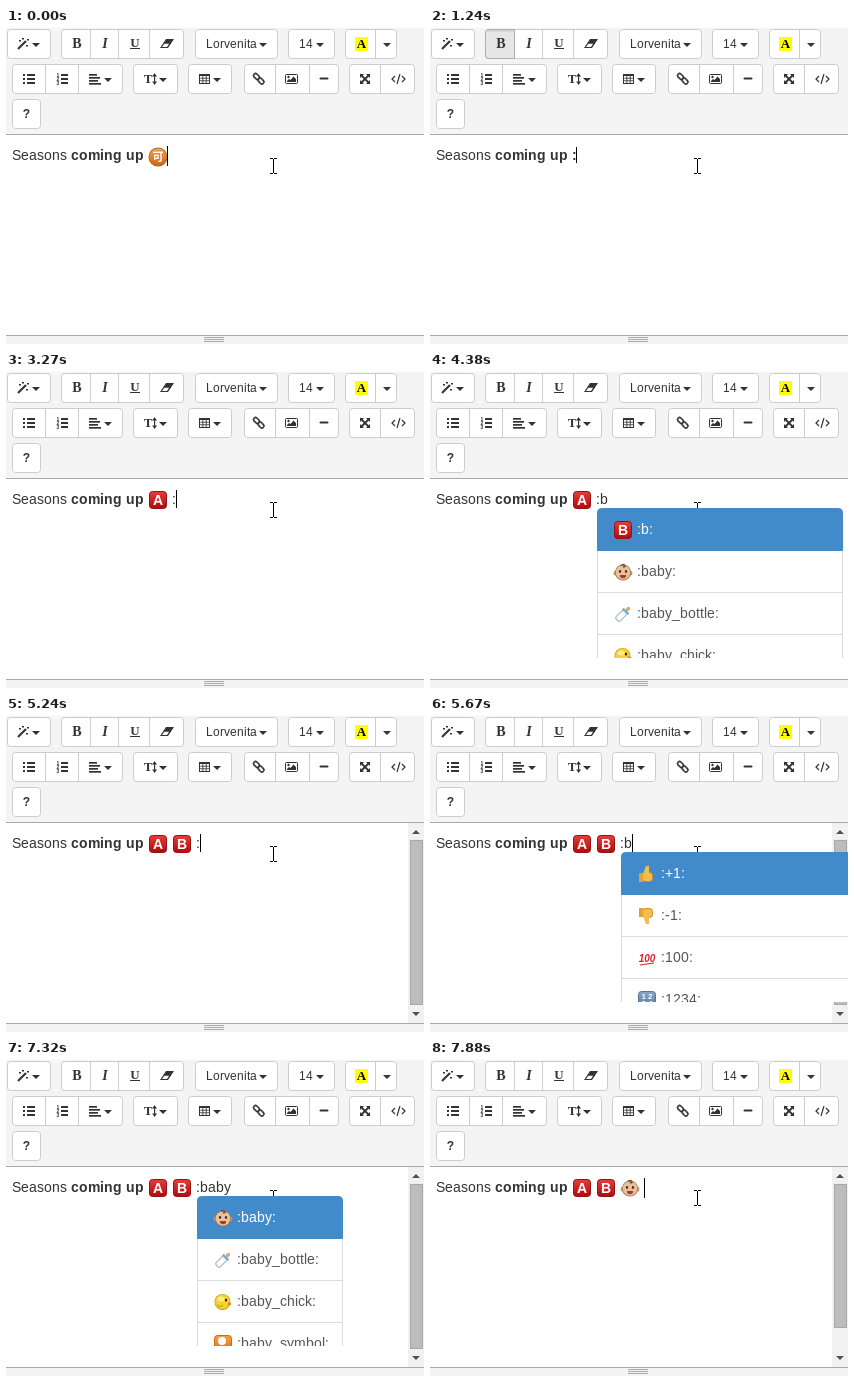
An HTML page with a canvas that plays this animation: 418x316 px, repeating every 8000 ms.

```html
<!DOCTYPE html>
<html lang="en">
<head>
<meta charset="utf-8">
<title>Emoji autocomplete in a text editor</title>
<style>
html, body { margin: 0; width: 100%; height: 100%; overflow: hidden; background: #fff; }
canvas { display: block; width: 418px; height: 316px; }
</style>
</head>
<body>
<canvas id="stage" width="418" height="316"></canvas>
<script>
const ctx = document.getElementById('stage').getContext('2d');
const SANS = '"Liberation Sans", Arial, sans-serif';
const SERIF = '"Liberation Serif", "Times New Roman", serif';
const INK = '#333';
const LOOP = 8000;

// Each step changes only the listed parts of the editor state.
const STEPS = [
  [0, { line: '{accept}', bold: false, caret: true, menu: null, thumbEnd: 0 }],
  [140, { line: '', bold: true }],
  [710, { caret: false }],
  [1240, { line: ':', caret: true }],
  [1520, { menu: '' }],
  [1670, { line: ':a' }],
  [1800, { menu: 'a' }],
  [2330, { caret: false }],
  [2580, { line: '{a}', menu: null, caret: true }],
  [2730, { line: '{a} ' }],
  [2860, { bold: false }],
  [3270, { line: '{a} :' }],
  [3520, { menu: '' }],
  [3670, { line: '{a} :b' }],
  [3800, { menu: 'b' }],
  [4380, { caret: false }],
  [4530, { line: '{a} {b}', menu: null, caret: true, thumbEnd: 289 }],
  [4930, { line: '{a} {b} ' }],
  [5240, { line: '{a} {b} :' }],
  [5520, { menu: '' }],
  [5670, { line: '{a} {b} :b' }],
  [5820, { menu: 'b' }],
  [5940, { line: '{a} {b} :ba' }],
  [6090, { menu: 'ba' }],
  [6480, { line: '{a} {b} :bab' }],
  [6620, { line: '{a} {b} :baby', menu: 'baby' }],
  [7320, { caret: false }],
  [7600, { line: '{a} {b} {baby}', menu: null, caret: true, thumbEnd: 268 }],
  [7880, { line: '{a} {b} {baby} ' }]
];

const MENUS = {
  '': { width: 290, names: ['+1', '-1', '100', '1234'] },
  a: { width: 221, names: ['a', 'ab', 'abc', 'abcd'] },
  b: { width: 246, names: ['b', 'baby', 'baby_bottle', 'baby_chick'] },
  ba: { width: 205, names: ['baby', 'baby_bottle', 'baby_chick', 'baby_symbol'] },
  baby: { width: 146, names: ['baby', 'baby_bottle', 'baby_chick', 'baby_symbol'] }
};

function rect(x, y, w, h, color) {
  ctx.fillStyle = color;
  ctx.fillRect(x, y, w, h);
}

function shape(color, points) {
  ctx.fillStyle = color;
  ctx.beginPath();
  points.forEach(([x, y]) => ctx.lineTo(x, y));
  ctx.fill();
}

function stroke(color, width, points) {
  ctx.strokeStyle = color;
  ctx.lineWidth = width;
  ctx.beginPath();
  points.forEach(([x, y]) => ctx.lineTo(x, y));
  ctx.stroke();
}

function oval(x, y, rx, ry, color) {
  ctx.fillStyle = color;
  ctx.beginPath();
  ctx.ellipse(x, y, rx, ry, 0, 0, Math.PI * 2);
  ctx.fill();
}

function box(x, y, w, h, radius, fill, border) {
  ctx.beginPath();
  ctx.roundRect(x + 0.5, y + 0.5, w - 1, h - 1, radius);
  ctx.fillStyle = fill;
  ctx.fill();
  if (border) {
    ctx.strokeStyle = border;
    ctx.lineWidth = 1;
    ctx.stroke();
  }
}

function fade(top, bottom) {
  const g = ctx.createLinearGradient(0, -9, 0, 9);
  g.addColorStop(0, top);
  g.addColorStop(1, bottom);
  return g;
}

// Text set on whole-pixel advances, as a hinted screen font would be.
function type(text, x, y, font, color) {
  ctx.font = font;
  ctx.fillStyle = color;
  ctx.textAlign = 'left';
  for (const ch of text) {
    ctx.fillText(ch, x, y);
    x += ch === ':' ? 4 : Math.round(ctx.measureText(ch).width);
  }
  return x;
}

function label(text, x, y, font, color) {
  ctx.font = font;
  ctx.fillStyle = color;
  ctx.textAlign = 'center';
  ctx.fillText(text, x, y);
}

// ---- emoji, drawn around their centre ----

function tile(top, bottom, edge, ...rows) {
  const size = rows.length > 1 ? 8 : [0, 14, 11, 9][rows[0].length];
  box(-9, -9, 18, 18, 3, fade(top, bottom), edge);
  rows.forEach((row, i) => {
    const y = rows.length > 1 ? -1 + i * 7 : size * 0.35;
    label(row, 0, y, `bold ${size}px ${SANS}`, '#fff');
  });
}
const redTile = text => tile('#e5413b', '#b3060b', '#9b1014', text);
const blueTile = (...rows) => tile('#8aa9c9', '#52749c', '#54749a', ...rows);

function thumb(dir) {
  ctx.scale(1, dir);
  box(-5, -2, 11, 10, 3, '#f5bd4c', '#c98a28');
  shape('#f5bd4c', [[-4, 0], [-1, -8], [2, -8], [2, 0]]);
  rect(-8, -1, 4, 9, '#e0a33a');
}

function babyFace() {
  oval(-7.5, 1, 2, 2.5, '#c99468');
  oval(7.5, 1, 2, 2.5, '#c99468');
  oval(0, 0.5, 8, 8, '#9c6d4b');
  oval(0, 0.5, 7.3, 7.3, '#e9c09b');
  stroke('#7a4d2d', 1.3, [[-2, -7], [1, -7.5], [2, -5.5], [0, -5]]);
  oval(-3, -0.5, 1.1, 1.4, '#42301f');
  oval(3, -0.5, 1.1, 1.4, '#42301f');
  ctx.fillStyle = '#a13f35';
  ctx.beginPath();
  ctx.arc(0, 3, 3.2, 0, Math.PI);
  ctx.fill();
}

function bottle() {
  ctx.rotate(Math.PI / 4);
  box(-3.5, -4, 7, 13, 2, '#eef3f7', '#a8b2bb');
  rect(-2, 0, 4, 7, '#fff');
  rect(-4, -5, 8, 2.5, '#79aee0');
  oval(0, -7, 1.8, 2.5, '#d9a860');
}

function chick() {
  oval(-0.5, 0, 8, 8, '#c99a16');
  oval(-0.5, -0.2, 7.3, 7.2, '#f8d32f');
  oval(-2, -3, 3.5, 2.5, '#fdeb83');
  oval(3, -2, 1.2, 1.5, '#2c2413');
  shape('#ec7d1c', [[5, 0], [9, 2], [5, 4]]);
  stroke('#c2921a', 1, [[-6, 2], [-3, 5], [0, 3]]);
}

const EMOJI = {
  accept() {
    oval(0, 0, 9.5, 9.5, '#a8560f');
    oval(0, 0, 8.8, 8.8, fade('#f3a24b', '#cf6310'));
    label('可', 0, 4, 'bold 11px "Noto Sans CJK SC", "Noto Sans CJK JP", sans-serif', '#fff');
  },
  a: () => redTile('A'),
  b: () => redTile('B'),
  ab: () => redTile('AB'),
  abc: () => blueTile('abc'),
  abcd: () => blueTile('a b', 'c d'),
  1234: () => blueTile('1 2', '3 4'),
  100() {
    label('100', 0, 4, `italic bold 10px ${SANS}`, '#d8232a');
    stroke('#d8232a', 1.2, [[-7, 7], [7, 5]]);
  },
  '+1': () => thumb(1),
  '-1': () => thumb(-1),
  baby: babyFace,
  baby_bottle: bottle,
  baby_chick: chick,
  baby_symbol() {
    tile('#f6a340', '#e06a10', '#c96a14', '');
    oval(-1, -3, 4, 4, '#fff');
    oval(3, 5, 5, 3, '#fff');
  }
};

function emoji(name, x, y) {
  ctx.save();
  ctx.translate(x, y);
  EMOJI[name]();
  ctx.restore();
}

// ---- toolbar ----

function group(y, ...edges) {
  const left = edges[0], right = edges[edges.length - 1];
  box(left, y, right - left, 30, 3, '#fff', '#ccc');
  edges.slice(1, -1).forEach(x => rect(x - 1, y, 1, 30, '#ccc'));
}

function arrow(x, y) {
  shape(INK, [[x - 4, y + 14], [x + 4, y + 14], [x, y + 18]]);
}

function bars(x, y, widths, step, thick) {
  widths.forEach((w, i) => rect(x, y + i * step, w, thick, INK));
}

function toolbar(boldOn) {
  rect(0, 0, 418, 106, '#f4f4f4');
  rect(0, 106, 418, 1, '#a9a9a9');

  group(1, 1, 45);
  group(1, 55, 85, 113, 144, 178);
  group(1, 189, 272);
  group(1, 282, 329);
  group(1, 339, 370, 391);
  group(36, 6, 40, 73, 117);
  group(36, 127, 172);
  group(36, 182, 226);
  group(36, 238, 270, 304, 333);
  group(36, 343, 375, 409);
  group(71, 6, 35);

  if (boldOn) {
    box(55, 1, 30, 30, [3, 0, 0, 3], '#e6e6e6', '#adadad');
    rect(56, 2, 28, 1, '#cfcfcf');
    rect(56, 3, 28, 1, '#d9d9d9');
  }

  [30, 257, 314, 381].forEach(x => arrow(x, 1));
  [102, 157, 211].forEach(x => arrow(x, 36));

  // magic wand
  stroke(INK, 2.2, [[12, 21], [20, 13]]);
  [[14, 12], [21, 17], [17, 10], [22, 11]].forEach(([x, y]) => rect(x - 1, y, 2, 1.5, INK));

  label('B', 71, 20, `bold 14px ${SERIF}`, INK);
  label('I', 99, 20, `italic bold 14px ${SERIF}`, INK);
  label('U', 129, 19, `bold 13px ${SERIF}`, INK);
  rect(124, 20, 10, 1, INK);

  // eraser
  shape(INK, [[154, 20], [160, 11], [168, 11], [162, 20]]);
  shape('#fff', [[156, 19], [158.3, 15.7], [163, 15.7], [161, 19]]);

  type('Lorvenita', 200, 20, `12px ${SANS}`, INK);
  type('14', 293, 20, `12px ${SANS}`, INK);
  rect(349, 9, 13, 14, '#ff0');
  label('A', 355.5, 20, `bold 13px ${SERIF}`, '#000');

  // lists and alignment
  bars(17, 46, [2, 2, 2], 4, 2);
  bars(21, 46, [8, 8, 8], 4, 2);
  [1, 2, 3].forEach(n => label(n, 52, 44.5 + n * 4, `bold 5px ${SANS}`, INK));
  bars(55, 46, [7, 7, 7], 4, 2);
  bars(83, 46, [8, 11, 9, 12], 3, 1.7);

  // text height
  label('T', 142, 55, `bold 13px ${SERIF}`, INK);
  rect(148, 47, 1.2, 8, INK);
  shape(INK, [[146.2, 48.5], [148.6, 45], [151, 48.5]]);
  shape(INK, [[146.2, 53.5], [148.6, 57], [151, 53.5]]);

  // table
  rect(193, 46, 11, 10, INK);
  for (let i = 0; i < 9; i++) {
    rect(194 + (i % 3) * 3.3, 48 + Math.floor(i / 3) * 2.6, 2.4, 1.8, '#fff');
  }

  // link
  for (const [x, y] of [[250.5, 48.5], [255, 53]]) {
    ctx.save();
    ctx.translate(x, y);
    ctx.rotate(Math.PI / 4);
    ctx.strokeStyle = INK;
    ctx.lineWidth = 1.6;
    ctx.beginPath();
    ctx.roundRect(-3.3, -2, 6.6, 4, 1.8);
    ctx.stroke();
    ctx.restore();
  }

  // picture
  box(279, 46, 13, 10, 1, '#fff', INK);
  oval(282.5, 49, 1.2, 1.2, INK);
  shape(INK, [[281, 54], [281, 53], [283, 51], [284.5, 52], [287.5, 48.5], [290, 51], [290, 54]]);

  box(313, 49, 10, 3, 1, INK);

  // full screen
  stroke(INK, 1.8, [[355.5, 47.5], [362.5, 54.5]]);
  stroke(INK, 1.8, [[362.5, 47.5], [355.5, 54.5]]);
  for (const sx of [-1, 1]) {
    for (const sy of [-1, 1]) {
      const x = 359 + 5 * sx, y = 51 + 5 * sy;
      shape(INK, [[x, y], [x - 4 * sx, y], [x, y - 4 * sy]]);
    }
  }

  // code
  stroke(INK, 1.2, [[389, 48], [386, 51], [389, 54]]);
  stroke(INK, 1.2, [[394, 46], [391, 56]]);
  stroke(INK, 1.2, [[396, 48], [399, 51], [396, 54]]);

  label('?', 20.5, 90, `bold 12px ${SANS}`, INK);
}

// ---- editor ----

function scrollbar(end) {
  rect(402, 107, 16, 200, '#f1f1f1');
  shape('#505050', [[406, 118], [414, 118], [410, 114]]);
  shape('#505050', [[406, 296], [414, 296], [410, 300]]);
  rect(404, 124, 13, end - 124, '#a8a8a8');
  rect(405, 125, 11, end - 126, '#bcbcbc');
}

function statusBar() {
  rect(0, 307, 418, 9, '#f4f4f4');
  rect(0, 307, 418, 1, '#a9a9a9');
  [309, 311, 313].forEach(y => rect(198, y, 20, 1, '#a9a9a9'));
}

// Draws the line with its caret and returns where the colon query starts.
function textLine({ line, bold, caret }) {
  type('Seasons ', 6, 132, `14px ${SANS}`, INK);
  let x = type('coming up ', 65, 132, `bold 14px ${SANS}`, INK);
  let queryX = x;
  const font = `${bold ? 'bold ' : ''}14px ${SANS}`;
  for (const [token, name] of line.matchAll(/\{(\w+)\}|./g)) {
    if (token === ':') queryX = x;
    if (name) {
      emoji(name, x + 10, name === 'accept' ? 129 : 128);
      x += 20;
    } else {
      x = type(token, x, 132, font, INK);
    }
  }
  if (caret) {
    const afterIcon = line.endsWith('}');
    const [top, height] = !line.includes('{') ? [119, 16] : [118, /[} ]$/.test(line) ? 20 : 18];
    rect(afterIcon ? x - 1 : x, top, 1, height, '#000');
  }
  return queryX;
}

function pointer() {
  rect(264, 130, 3, 1, '#000');
  rect(268, 130, 3, 1, '#000');
  rect(267, 131, 1, 14, '#000');
  rect(264, 145, 3, 1, '#000');
  rect(268, 145, 3, 1, '#000');
}

function popup(x, { width, names }) {
  ctx.save();
  ctx.beginPath();
  ctx.rect(x, 136, width, 150);
  ctx.clip();
  box(x, 136, width, 170, 4, '#fff', '#ddd');
  names.forEach((name, i) => {
    const y = 136 + 42 * i;
    if (i) rect(x, y + 42, width, 1, '#ddd');
    else box(x, y, width, 43, [4, 4, 0, 0], '#428bca', '#428bca');
    emoji(name, x + 26, y + 22);
    type(`:${name}:`, x + 40, y + 26, `14px ${SANS}`, i ? '#555' : '#fff');
  });
  ctx.restore();
}

function stateAt(time) {
  const state = {};
  for (const [start, change] of STEPS) {
    if (start <= time) Object.assign(state, change);
  }
  return state;
}

function draw(time) {
  const state = stateAt(time);
  rect(0, 0, 418, 316, '#fff');
  toolbar(state.bold);
  if (state.thumbEnd) scrollbar(state.thumbEnd);
  statusBar();
  const queryX = textLine(state);
  pointer();
  if (state.menu !== null) popup(queryX + 1, MENUS[state.menu]);
}

const started = performance.now();
function frame() {
  draw((performance.now() - started) % LOOP);
  requestAnimationFrame(frame);
}
frame();
</script>
</body>
</html>
```
